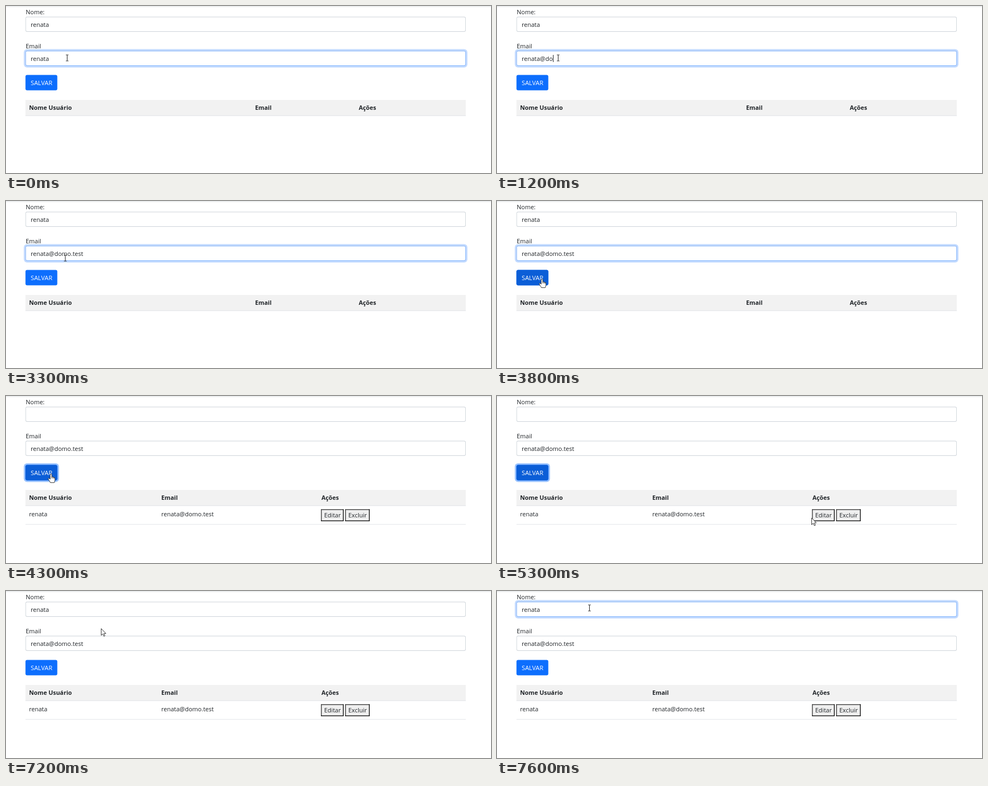
Write an HTML page with a canvas that moves like this. It is 884 px wide and 304 px high and loops after 8000 ms.

```html
<!DOCTYPE html>
<html lang="pt">
<head>
<meta charset="utf-8">
<title>Cadastro</title>
<style>
html, body { margin: 0; width: 100%; height: 100%; overflow: hidden; background: #fff; }
canvas { display: block; width: 884px; height: 304px; }
</style>
</head>
<body>
<canvas id="stage"></canvas>
<script>
const W = 884, H = 304, LOOP = 8000, STEP = 100;
const LEFT = 35.5, WIDE = 802.5;
const INK = '#212529', LINE = '#dee2e6', BLUE = '#0d6efd';
const FAMILY = '"Open Sans", "Noto Sans", sans-serif';
const NAME = 'renata', EMAIL = 'renata@domo.test';

const box = (x, y, w, h) => ({ x, y, w, h });
const point = (x, y) => ({ x, y });

const nameBox = box(LEFT, 19.5, WIDE, 27.5);
const emailBox = box(LEFT, 81.5, WIDE, 27.5);
const saveBox = box(LEFT, 125.5, 58, 28);
const editBox = box(574, 206, 41.5, 22);
const deleteBox = box(618, 206, 45, 22);

// Resting places of the pointer and the curves between them
const onEmail = point(111.5, 94.5), onSave = point(82, 141.5);
const onEdit = point(594, 222), onName = point(168.5, 30.8);
const moves = [
  { start: 3200, end: 3800, path: [onEmail, point(108, 112), point(82, 139), onSave] },
  { start: 4600, end: 5500, path: [onSave, point(430, 188), point(604, 234), onEdit] },
  { start: 6400, end: 7300, path: [onEdit, point(531, 93), point(140, 165), onName] }
];

const ARROW = new Path2D('M0 0V12.2L2.9 9.6 4.9 14 6.8 13.1 4.9 8.9H8.6Z');
const HAND = new Path2D('M-1.4 1.2Q0-.7 1.4 1.2V5.6Q3 4.6 3.7 6.2Q5.2 5.4 5.7 7' +
  'Q7.2 6.6 7.2 8.4V11.5Q7.2 13.5 6 16.2H-1.2Q-2 14-4.6 10.6Q-5.8 8.7-4.3 8.3Q-3 8-1.4 9.8Z');
const KNUCKLES = new Path2D('M1.4 5.6V8.4M3.7 6.2V8.6M5.7 7V8.8');

const canvas = document.getElementById('stage');
const ctx = canvas.getContext('2d');
const ratio = window.devicePixelRatio || 1;
canvas.width = W * ratio;
canvas.height = H * ratio;

const progress = (t, start, end) => Math.min(1, Math.max(0, (t - start) / (end - start)));
const fade = (t, start) => progress(t, start, start + 2 * STEP);
const inside = (b, p) => p.x >= b.x && p.x <= b.x + b.w && p.y >= b.y && p.y <= b.y + b.h;
const lerp = (a, b, u) => point(a.x + (b.x - a.x) * u, a.y + (b.y - a.y) * u);

function bezier(points, u) {
  if (points.length === 1) return points[0];
  return bezier(points.slice(1).map((p, i) => lerp(points[i], p, u)), u);
}

function rect(x, y, w, h, color) {
  ctx.fillStyle = color;
  ctx.fillRect(x, y, w, h);
}

function rounded(b, grow, color, alpha = 1) {
  ctx.globalAlpha = alpha;
  ctx.fillStyle = color;
  ctx.beginPath();
  ctx.roundRect(b.x - grow, b.y - grow, b.w + 2 * grow, b.h + 2 * grow, 3 + grow);
  ctx.fill();
  ctx.globalAlpha = 1;
}

function text(str, x, y, { size = 11, weight = 400, color = INK } = {}) {
  ctx.font = `${weight} ${size}px ${FAMILY}`;
  ctx.fillStyle = color;
  ctx.fillText(str, x, y);
}

function input(b, value, focus) {
  rounded(b, 3, BLUE, 0.25 * focus);
  rounded(b, 0, '#ced4da');
  rounded(b, 0, '#86b7fe', focus);
  rounded(b, -0.9, '#fff');
  text(value, 45, b.y + 18);
}

function saveButton(focus, hover) {
  rounded(saveBox, 3, '#3184fd', 0.5 * focus);
  rounded(saveBox, 0, BLUE);
  rounded(saveBox, 0, '#0b5ed7', hover);
  text('SALVAR', 45, 144, { size: 11.3, color: '#fff' });
}

function plainButton(b, label) {
  rect(b.x, b.y, b.w, b.h, '#1c1c1c');
  rect(b.x, b.y, b.w - 1.5, b.h - 1.5, '#4a4a4a');
  rect(b.x + 1.5, b.y + 1.5, b.w - 3, b.h - 3, '#efefef');
  text(label, b.x + 6, 221);
}

function table(filled) {
  const columns = filled ? [42, 283, 575] : [42, 454, 643];
  rect(LEFT, 171, WIDE, 29, '#f2f2f2');
  rect(LEFT, 199.3, WIDE, 0.9, LINE);
  ['Nome Usuário', 'Email', 'Ações'].forEach((label, i) =>
    text(label, columns[i], 189.3, { size: 10.9, weight: 700 }));
  if (!filled) return;
  text(NAME, columns[0], 219);
  text(EMAIL, columns[1], 219);
  plainButton(editBox, 'Editar');
  plainButton(deleteBox, 'Excluir');
  rect(LEFT, 233.3, WIDE, 0.9, LINE);
}

function outline(path) {
  ctx.fillStyle = '#fff';
  ctx.fill(path);
  ctx.strokeStyle = '#222';
  ctx.lineWidth = 0.9;
  ctx.lineJoin = 'round';
  ctx.stroke(path);
}

function pointer(t, filled) {
  const move = moves.findLast(m => m.start <= t) || moves[0];
  const p = bezier(move.path, progress(t, move.start, move.end));
  ctx.save();
  ctx.translate(p.x, p.y);
  if (inside(nameBox, p) || inside(emailBox, p)) {
    rect(-0.5, -5.5, 1, 11, '#222');
    rect(-2.5, -6, 5, 1, '#444');
    rect(-2.5, 5, 5, 1, '#444');
  } else if (inside(saveBox, p) || (filled && inside(editBox, p))) {
    outline(HAND);
    ctx.stroke(KNUCKLES);
  } else {
    outline(ARROW);
  }
  ctx.restore();
}

// Hesitant for the first keys, then at a steady pace
function typedCount(t) {
  if (t < 100) return 0;
  return Math.floor(t < 1000 ? 1 + (t - 100) / 450 : 3 + (t - 1000) / 228);
}

function draw(t) {
  const filled = t >= 4300;
  const typed = typedCount(t);
  const email = EMAIL.slice(0, NAME.length + typed);
  const released = fade(t, 5700);

  ctx.setTransform(ratio, 0, 0, ratio, 0, 0);
  rect(0, 0, W, H, '#fff');
  rect(0, 0.5, W, 1.3, '#e4e6e8');

  text('Nome:', 36, 15);
  input(nameBox, filled && t < 5900 ? '' : NAME, fade(t, 7300));
  text('Email', 36, 77);
  input(emailBox, email, 1 - fade(t, 3900));
  if (typed && t < 3000) {
    rect(Math.round(45 + ctx.measureText(email).width), 89, 1, 13, INK);
  }
  saveButton(fade(t, 3900) - released, fade(t, 3500) - released);
  table(filled);
  pointer(t, filled);
}

function tick() {
  const t = performance.now() % LOOP;
  draw(Math.floor(t / STEP) * STEP);
  requestAnimationFrame(tick);
}
tick();
</script>
</body>
</html>
```
